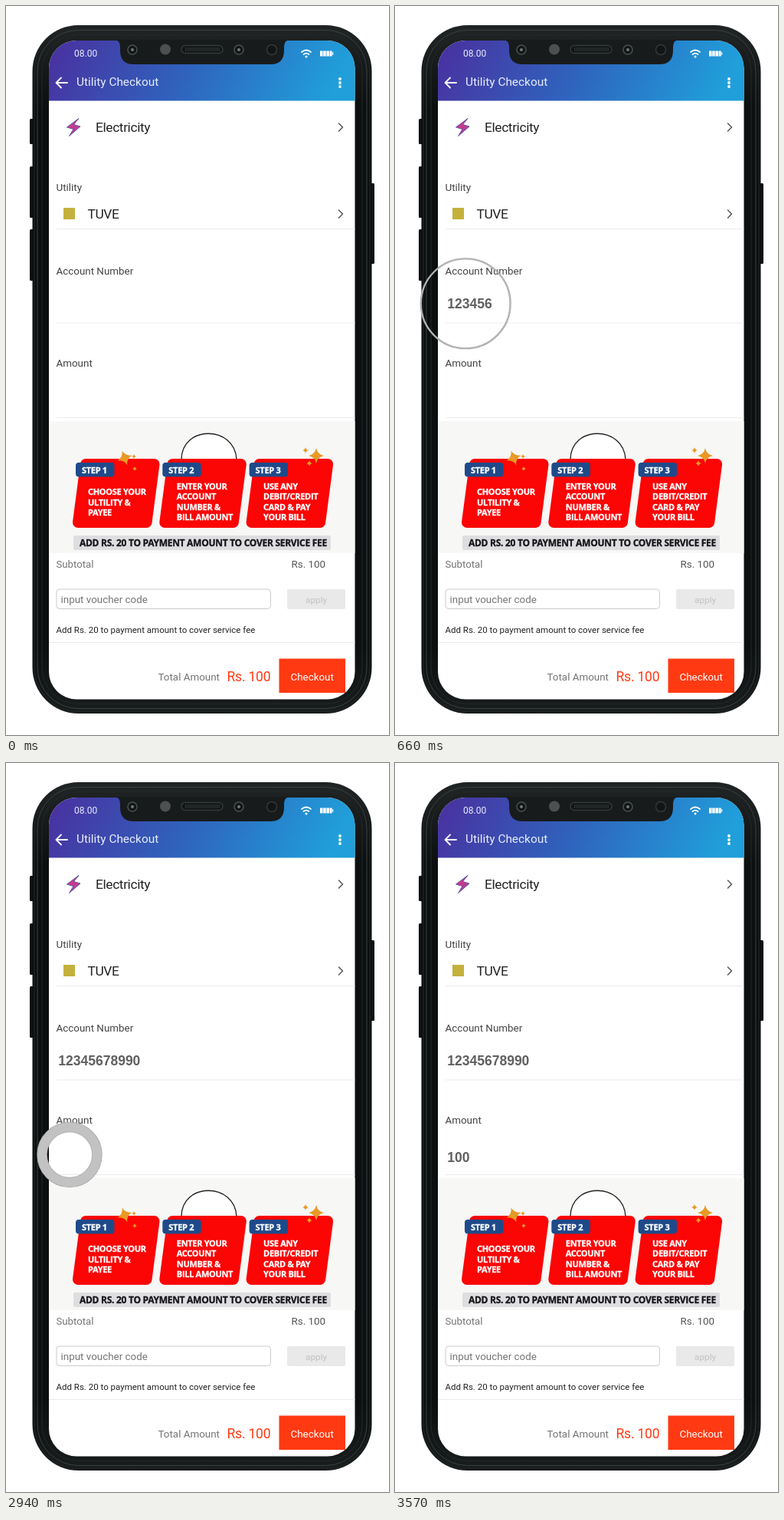
An HTML page that plays this animation: 500 by 950 pixels, repeating every 4.14 s.

```html
<!DOCTYPE html>
<html lang="en">
<head>
<meta charset="utf-8">
<title>Utility checkout</title>
<style>
  html, body { margin: 0; width: 100%; height: 100%; overflow: hidden; background: #fff; }
  svg { display: block; width: 100%; height: 100%; }
  text { font-family: Roboto, sans-serif; font-size: 13.4px; fill: #444; white-space: pre; }
  .soft { fill: #757575; }
  .big { font-size: 17.4px; letter-spacing: -.4px; fill: #222; }
  .light { fill: #e9edfa; }
  .promo text { font-family: "Open Sans", sans-serif; font-weight: 700; font-size: 11px; letter-spacing: -.3px; fill: #fff; stroke: #fff; stroke-width: .3px; }
  .promo .fee { font-size: 12px; letter-spacing: -.28px; fill: #16161a; stroke: #16161a; }
  .typed { font: 700 17.5px "Liberation Sans", Arial, sans-serif; fill: #606060; }
  .line { fill: none; stroke-linecap: round; stroke-linejoin: round; }
</style>
</head>
<body>
<svg viewBox="0 0 500 950">
  <defs>
    <linearGradient id="head" x1="0" y1="0" x2="1" y2=".1">
      <stop offset="0" stop-color="#4a2f9f"/>
      <stop offset=".5" stop-color="#2f63bd"/>
      <stop offset="1" stop-color="#209fda"/>
    </linearGradient>
    <linearGradient id="bezel" x1="0" y1="0" x2="0" y2="1">
      <stop offset="0" stop-color="#212526"/>
      <stop offset=".12" stop-color="#0c0f0f"/>
      <stop offset=".9" stop-color="#0c0f0f"/>
      <stop offset="1" stop-color="#191d1d"/>
    </linearGradient>
    <linearGradient id="bolt" x1="0" y1="0" x2="1" y2="1">
      <stop offset="0" stop-color="#e8357c"/>
      <stop offset="1" stop-color="#a0409f"/>
    </linearGradient>
    <clipPath id="screen"><rect x="56" y="45" width="399.5" height="858.5" rx="36"/></clipPath>
    <path id="star" d="M0-10Q1.5-2 10 0Q1.5 2 0 10Q-1.5 2-10 0Q-1.5-2 0-10Z"/>
    <path id="chevron" class="line" d="M-2.5-5L2.5 0L-2.5 5" stroke="#555" stroke-width="1.5"/>
  </defs>

  <!-- phone body -->
  <g fill="#0e1112">
    <rect x="31" y="147" width="6" height="33" rx="1.5"/>
    <rect x="31" y="209" width="6" height="67" rx="1.5"/>
    <rect x="31" y="291" width="6" height="67" rx="1.5"/>
    <rect x="475" y="231" width="6" height="105" rx="1.5"/>
  </g>
  <rect x="34.5" y="25" width="443" height="897" rx="60" fill="url(#bezel)"/>
  <g fill="none">
    <rect x="37" y="27.5" width="438" height="892" rx="57.5" stroke="#1d2222" stroke-width="1.5"/>
    <rect x="41" y="31.5" width="430" height="884" rx="53.5" stroke="#3a4041"/>
    <rect x="47" y="37.5" width="418" height="872" rx="47.5" stroke="#232828"/>
  </g>

  <!-- app -->
  <g clip-path="url(#screen)">
    <path d="M55 45H456V904H55Z" fill="#fff"/>
    <path d="M55 45H456V123.500H55Z" fill="url(#head)"/>
    <path d="M66 290.500H456M66 413H456M66 536.500H456M56 829.500H456" stroke="#ebebeb"/>
    <path d="M55 541H456V713H55Z" fill="#f7f7f6"/>
  </g>
  <path d="M142 44H370Q363 45 363 53V58Q363 76 345 76H167Q149 76 149 58V53Q149 45 142 44Z" fill="#181b1c"/>
  <g fill="#111516" stroke="#4b5152" stroke-width="1.5">
    <circle cx="165" cy="57" r="6"/>
    <circle cx="304" cy="57" r="6"/>
    <circle cx="347" cy="57" r="6.5" stroke="#33383a"/>
    <rect x="229" y="51.5" width="54" height="10" rx="5" stroke="#333839"/>
  </g>
  <circle cx="208" cy="56.5" r="7" fill="#4c5051"/>
  <path d="M234 56.500H279" stroke="#303536" stroke-width="5" stroke-dasharray="1 1"/>
  <g fill="#717879"><circle cx="165" cy="57" r="2"/><circle cx="304" cy="57" r="2"/></g>

  <text x="89" y="66" class="light" style="font-size:12px">08.00</text>
  <text x="92" y="103.5" class="light" style="font-size:15.4px">Utility Checkout</text>
  <g class="line" stroke="#fff" stroke-width="1.8">
    <path d="M80 100H66M72 93.500L65.500 100L72 106.500"/>
    <path d="M386 60Q392 55 398 60M388.500 63Q392 60.200 395.500 63"/>
  </g>
  <g fill="#fff">
    <circle cx="392" cy="66" r="1.5"/>
    <path d="M410 58.500h3.500v7h-3.500zm4.200 0h3.500v7h-3.500zm4.200 0h3.500v7h-3.500zm4.200 0h3v7h-3zm3.500 1.700h1.200v3.500h-1.200z"/>
    <circle cx="436" cy="95" r="1.9"/><circle cx="436" cy="100" r="1.9"/><circle cx="436" cy="105" r="1.9"/>
  </g>

  <path d="M95 146.500L79.500 158L88 160.500L82.500 169.500L97 157L88.500 154.500Z" fill="url(#bolt)" stroke="#5b55a8"/>
  <text x="117" y="164" class="big">Electricity</text>
  <text x="65.5" y="241">Utility</text>
  <rect x="75" y="263" width="15" height="15" fill="#c3b13c"/>
  <text x="106.5" y="276.5" class="big">TUVE</text>
  <use href="#chevron" x="437" y="158"/>
  <use href="#chevron" x="437" y="271"/>
  <text x="65.5" y="350">Account Number</text>
  <text x="65.5" y="470">Amount</text>

  <!-- promotion -->
  <path d="M229 591C229 546 299 546 301 591Z" fill="#fff" stroke="#222" stroke-width="1.4"/>
  <g class="promo">
    <g id="cards"></g>
    <rect x="88" y="690" width="336" height="19" rx="2" fill="#dedee1"/>
    <text x="96" y="704" class="fee">ADD RS. 20 TO PAYMENT AMOUNT TO COVER SERVICE FEE</text>
  </g>
  <g fill="#e79a26">
    <use href="#star" transform="translate(155 589) rotate(-20)"/>
    <use href="#star" transform="translate(168 603) scale(.3)"/>
    <use href="#star" transform="translate(167 587) scale(.3)"/>
    <use href="#star" transform="translate(405 586)"/>
    <use href="#star" transform="translate(391 579) scale(.4)"/>
    <use href="#star" transform="translate(396 596) scale(.4)"/>
  </g>

  <!-- totals -->
  <text x="65.5" y="732" class="soft" style="font-size:13.2px">Subtotal</text>
  <text x="372.5" y="732" style="fill:#555">Rs. 100</text>
  <rect x="66" y="760" width="279.5" height="25.5" rx="4" fill="#fff" stroke="#cbcbcb"/>
  <text x="71.5" y="777.5" class="soft">input voucher code</text>
  <rect x="367" y="760" width="76" height="26" rx="2" fill="#e9e9ea"/>
  <text x="391" y="777.5" style="font-size:11.8px;fill:#c2c2c4">apply</text>
  <text x="65.5" y="817" style="font-size:11.5px;fill:#222">Add Rs. 20 to payment amount to cover service fee</text>
  <text x="198.5" y="878.5" class="soft">Total Amount</text>
  <text x="288.5" y="879.5" style="font-size:17.5px;letter-spacing:-.2px;fill:#ff3a12">Rs. 100</text>
  <rect x="356.5" y="850.5" width="86.500" height="44.500" fill="#ff3a12"/>
  <text x="371.5" y="878.5" style="fill:#fff">Checkout</text>

  <!-- moving parts -->
  <text id="account" x="68.3" y="394" class="typed"></text>
  <text id="amount" x="68.3" y="520" class="typed"></text>
  <g id="ring" fill="none">
    <circle stroke="#aaa"/>
    <circle stroke="#c2c2c2"/>
  </g>
</svg>
<script>
const LOOP = 4140, FRAME = 30, TAP = 840, KEY = 120;
const $ = id => document.getElementById(id);

const steps = [
  ["CHOOSE YOUR", "ULTILITY &amp;", "PAYEE"],
  ["ENTER YOUR", "ACCOUNT", "NUMBER &amp;", "BILL AMOUNT"],
  ["USE ANY", "DEBIT/CREDIT", "CARD &amp; PAY", "YOUR BILL"]
];
$("cards").innerHTML = steps.map((lines, i) => {
  const top = lines.length === 3 ? 637 : 629.5;
  const textX = i ? 109.5 : 107;
  return `<g transform="translate(${i * 113.3} 0)">
    <path d="M104 597H193.5L183.500 673H94Z" fill="#fb0505" stroke="#fb0505" stroke-width="14" stroke-linejoin="round"/>
    <rect x="91" y="595" width="50.5" height="18.5" rx="4" fill="#1f4a8a"/>
    <text x="99" y="608.5">STEP ${i + 1}</text>` +
    lines.map((s, n) => `<text x="${textX}" y="${top + n * 13.6}">${s}</text>`).join("") + "</g>";
}).join("");

const taps = [
  { start: 30, x: 92.2, y: 387.8 },
  { start: 2730, x: 83, y: 510.5 }
];

function type(id, text, start, t) {
  $(id).textContent = text.slice(0, Math.max(0, Math.floor((t - start) / KEY) + 1));
}

function drawRing(t) {
  const tap = taps.find(k => t >= k.start && t < k.start + TAP);
  $("ring").style.display = tap ? "" : "none";
  if (!tap) return;
  const left = Math.max(0, 1 - (t - tap.start + 7) / TAP);
  const outer = 59.7 * (1 - left ** 4.2);
  const width = Math.min(outer, 21.4 * left ** 1.55);
  [...$("ring").children].forEach((c, i) => {
    c.setAttribute("cx", tap.x);
    c.setAttribute("cy", tap.y);
    c.setAttribute("r", outer - width / 2);
    c.setAttribute("stroke-width", Math.max(0, width - i * 1.6));
  });
}

const begin = performance.now();
function draw(now) {
  const t = Math.floor(Math.max(0, now - begin) % LOOP / FRAME) * FRAME;
  type("account", "12345678990", 60, t);
  type("amount", "100", 2970, t);
  drawRing(t);
  requestAnimationFrame(draw);
}
draw(begin);
</script>
</body>
</html>
```
